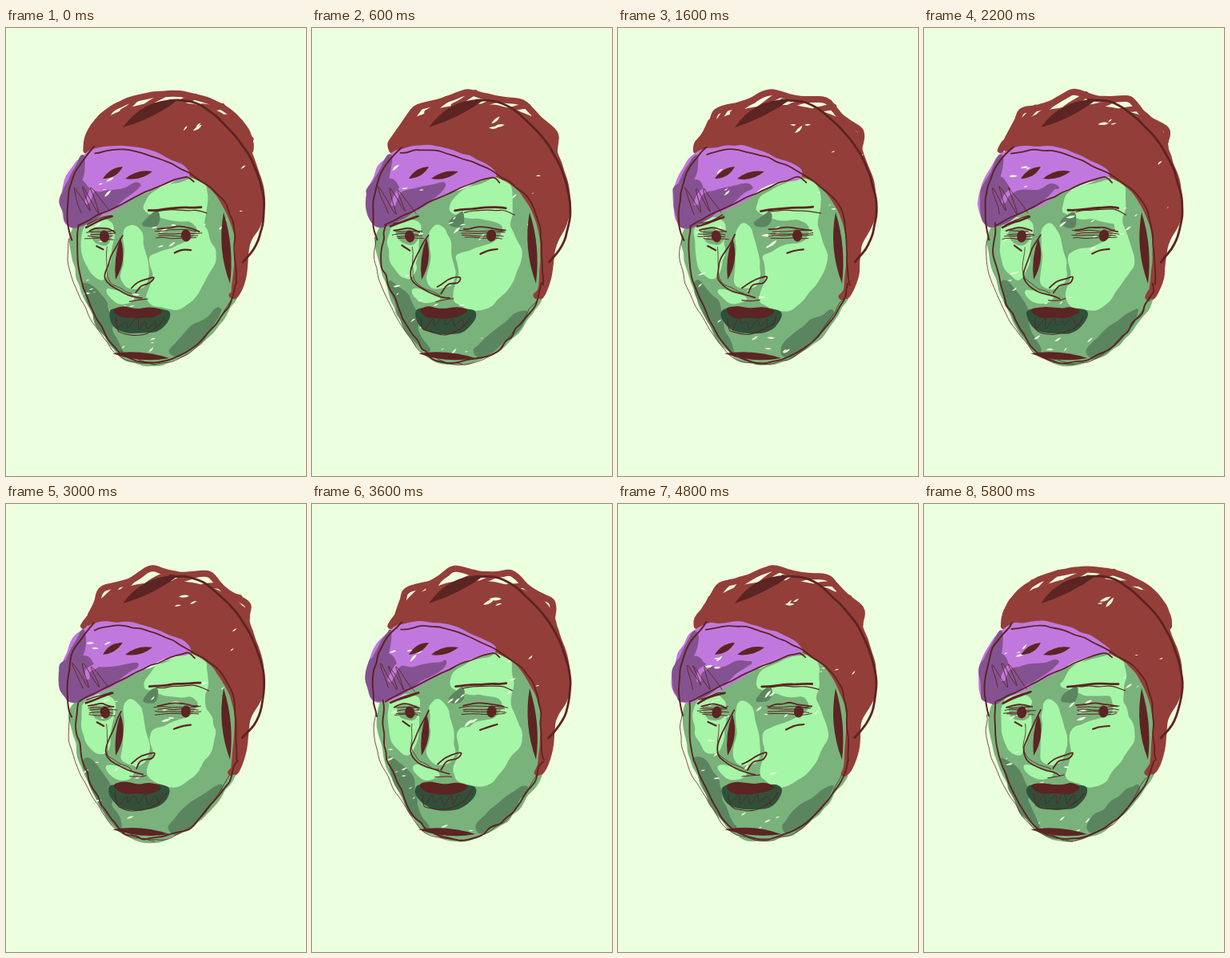
Animation, 375 px wide and 559 px high, one loop 6000 ms. Source, as an HTML page with a canvas:

```html
<!DOCTYPE html>
<html>
<head>
<meta charset="utf-8">
<style>
html, body { margin: 0; width: 100%; height: 100%; overflow: hidden; background: #ecffde }
canvas { display: block }
</style>
</head>
<body>
<canvas id="stage" width="375" height="559"></canvas>
<script>
const ctx = document.getElementById('stage').getContext('2d');
const PAPER = '#ecffde', LIGHT = '#a5f6a6', MID = '#7ab27b', DARK = '#5b855f', DEEP = '#30503a',
  HAT = '#943e39', INK = '#5c2422', PURPLE = '#c178de', PLUM = '#855291';
const STEP = 200, COUNT = 30;
const JAW = '90,246 90,300 110,355 142,405 185,418 235,398 278,348 287,320';

let seed;
function rnd() {
  seed = (seed * 16807) % 2147483647;
  return seed / 2147483647;
}
const jit = amount => (rnd() * 2 - 1) * amount;
const keys = text => text.split(' ').map(pair => pair.split(',').map(Number));

// Catmull-Rom through a few key points, sampled about every `gap` pixels
function sample(points, closed, gap) {
  const n = points.length, out = [];
  const at = i => points[closed ? (i + n) % n : Math.max(0, Math.min(n - 1, i))];
  for (let i = 0; i < (closed ? n : n - 1); i++) {
    const [a, b, c, d] = [at(i - 1), at(i), at(i + 1), at(i + 2)];
    const parts = Math.max(1, Math.round(Math.hypot(c[0] - b[0], c[1] - b[1]) / gap));
    for (let k = 0; k < parts; k++) {
      const t = k / parts;
      out.push([0, 1].map(j => b[j] + t / 2 * (c[j] - a[j] +
        t * (2 * a[j] - 5 * b[j] + 4 * c[j] - d[j] + t * (3 * (b[j] - c[j]) + d[j] - a[j])))));
    }
  }
  if (!closed) out.push(points[n - 1]);
  return out;
}

// Shaky hand: the key curve is resampled and every sample is nudged
function trace(shape, closed, shake, gap = 10) {
  const points = typeof shape === 'string' ? keys(shape) : shape;
  const p = sample(points, closed, gap).map(([x, y]) => [x + jit(shake), y + jit(shake)]);
  const n = p.length, mid = (a, b) => [(a[0] + b[0]) / 2, (a[1] + b[1]) / 2];
  ctx.beginPath();
  ctx.moveTo(...(closed ? mid(p[n - 1], p[0]) : p[0]));
  for (let i = closed ? 0 : 1; i < n; i++) {
    const last = !closed && i === n - 1;
    ctx.quadraticCurveTo(...p[i], ...(last ? p[i] : mid(p[i], p[(i + 1) % n])));
  }
}

function fill(color, shape, shake = 2, edge = 4) {
  trace(shape, true, shake);
  ctx.fillStyle = ctx.strokeStyle = color;
  ctx.lineWidth = edge;
  ctx.fill();
  ctx.stroke();
}

function line(shape, width = 1.6, shake = 1, color = INK) {
  trace(shape, false, shake);
  ctx.strokeStyle = color;
  ctx.lineWidth = width;
  ctx.stroke();
}

// A pointed stroke, `fat` pixels thick in the middle
function blade(x1, y1, x2, y2, fat, bend = 0, color = INK) {
  const len = Math.hypot(x2 - x1, y2 - y1), nx = (y2 - y1) / len, ny = (x1 - x2) / len;
  const cx = (x1 + x2) / 2 + jit(1), cy = (y1 + y2) / 2 + jit(1);
  ctx.fillStyle = color;
  ctx.beginPath();
  ctx.moveTo(x1, y1);
  for (const [off, x, y] of [[bend + fat, x2, y2], [bend - fat, x1, y1]])
    ctx.quadraticCurveTo(cx + nx * off, cy + ny * off, x, y);
  ctx.fill();
}

// Slivers of bare paper
function chips(count, x, y, rx, ry, size) {
  while (count--) {
    const cx = x + jit(rx), cy = y + jit(ry), a = jit(.5) - .4, r = size * (.4 + rnd() * .6);
    const dx = Math.cos(a) * r, dy = Math.sin(a) * r;
    blade(cx - dx, cy - dy, cx + dx, cy + dy, r * .5, 0, PAPER);
  }
}

function scribble(x, y, w, h, loops, slant) {
  const points = [];
  for (let i = 0; i <= loops * 2; i++) {
    const side = i % 2 ? -1 : 1;
    points.push([x + w * (i / loops / 2 - .5) - side * slant + jit(2), y + side * h / 2 + jit(3)]);
  }
  line(points, .9, 1);
}

function drawFace() {
  fill(MID, JAW + ' 284,250 262,205 235,188 180,207', 2, 7);
  fill(DARK, '97,318 124,342 132,378 145,404 117,374', 2.5);
  fill(DARK, '268,352 234,374 204,402 210,411 244,389', 2.5);
  fill(LIGHT, '173,227 190,203 240,189 250,215 247,245 261,285 250,312 225,345 202,350 178,338 187,306 182,285 206,275 235,264 238,242 200,236', 2.5);
  fill(LIGHT, '150,249 166,252 177,308 165,324 146,318 150,285', 2);
  fill(LIGHT, '101,246 132,244 128,299 117,312 98,288', 2.5);
  fill(LIGHT, '126,327 160,337 140,343', 1.5);
  fill(MID, '105,253 133,253 127,270 110,266', 1.5, 2);
  fill(DARK, '170,245 190,229 188,247', 2, 2);
  chips(5, 195, 255, 22, 20, 7);
  chips(4, 118, 255, 20, 12, 6);
  chips(6, 155, 350, 45, 25, 5);
  chips(5, 175, 400, 40, 14, 5);
  chips(4, 260, 230, 14, 40, 5);
  chips(3, 110, 315, 14, 20, 5);
}

// Half ellipse over the head, inset by a function of its position u
function arch(inset, ry) {
  return Array.from({ length: 37 }, (_, i) => {
    const u = i / 36, a = Math.PI * (1 + u), k = inset(u);
    return [203 + (103 - k) * Math.cos(a), 152 + (ry - k) * Math.sin(a)];
  });
}

function drawHat(frame) {
  const peak = Math.sqrt(Math.sin(Math.PI * frame / (COUNT - 1)) + 1e-9);
  const drift = frame ? jit(.03) : 0;
  const crest = arch(u => peak * (11 * Math.abs(Math.sin(4.5 * Math.PI * (u + drift))) - 5), 70);
  const core = arch(() => 2, 60 - 4 * peak);
  fill(HAT, [...core, ...keys('320,200 319,240 303,270 298,312 284,336 287,260 260,203 210,174 155,153 110,154')], .8);
  line(crest, 8, .6, HAT);
  // Zigzag between crest and crown
  for (let i = 3; i < 32; i += 4) line([core[i], crest[i + 3]], 5 + rnd() * 3, 1.5, HAT);
  line('292,300 289,322 281,335', 8, 2, HAT);
  chips(3, 227, 121, 14, 7, 8);
  chips(2, 285, 190, 20, 40, 4);
}

function drawBand() {
  fill(PURPLE, '98,158 155,149 205,166 230,183 190,195 130,227 80,246 71,205', 2);
  fill(PLUM, '71,202 94,189 116,206 166,197 127,227 79,247', 3);
  fill(PLUM, '98,158 84,180 72,208 94,190', 1.5, 3);
  line('100,217 108,203 121,197', 6, 3, PURPLE);
  chips(4, 118, 190, 22, 18, 6);
}

function eye(x, y, w, pupil) {
  line([[x - w / 2, y - 5], [x, y - 9], [x + w / 2, y - 4]], 1.8, 1.2);
  for (let i = 0; i < 4; i++)
    line([[x - w / 2 + jit(4), y - 4 + i * 3], [x + w / 2 + jit(4), y - 4 + i * 3]], 1, 1.5);
  ctx.fillStyle = INK;
  ctx.beginPath();
  ctx.ellipse(pupil + jit(1), y + 2, 6, 7.5, jit(.3), 0, 7);
  ctx.fill();
}

function drawInk() {
  // Hat and band
  blade(146, 124, 216, 89, 14, 7);
  line('205,90 245,97 297,148 322,212 316,264 296,292', 2.8, .6);
  line('110,157 150,152 209,171 262,204 283,240 287,290 289,320', 1.8, 1.4);
  blade(272, 230, 280, 319, 11, -1);
  line('111,148 86,180 77,215 77,248 82,265', 2, 1.2);
  scribble(103, 215, 34, 32, 3, -8);
  line('91,246 143,220 190,198 228,185 235,192', 1.8, 1);
  blade(121, 188, 146, 173, 8);
  blade(149, 188, 183, 179, 8);

  // Jaw
  line(JAW, 1.9, rnd() < .6 ? 3 : 1);
  line('80,262 78,290 94,340 139,407 187,420', .8, 1.5);
  line('142,405 187,420 239,397 281,338', .8, 2);
  blade(133, 406, 204, 412, 9);

  // Eyes and brows
  eye(119, 258, 32, 123);
  eye(215, 257, 52, 225);
  line('99,248 119,240 133,235', 2.6, 1.2);
  line('102,245 131,234', 1.3, 1.5);
  line('179,228 211,225 243,224', 2.8, 1);
  line('189,229 239,227 252,232', 1.2, 1.6);
  line('113,272 122,277', 2.2, 1);
  line('211,281 219,277 232,276', 2.2, 1.2);

  // Nose
  blade(143, 262, 137, 314, 9, 3);
  line('145,258 131,285 124,313 142,328 171,338', 1.7, 1.5);
  line('126,273 127,313 158,332', .8, 2);
  line('156,324 170,315 187,310 183,318 168,321 162,331', 1.8, 1.3);
  line('155,341 176,339', 1.1, 1.5);
}

function drawMouth() {
  fill(DEEP, '131,354 166,353 202,355 187,377 145,376', 1.3, 5);
  fill(INK, '133,351 147,348 165,351 184,349 197,353 184,360 143,360', 1.3, 2);
  scribble(167, 368, 48, 14, 4, 2);
  line('138,362 138,376 164,382 187,375 199,360', 1.1, 2);
}

function render() {
  const frame = Math.floor(performance.now() / STEP) % COUNT;
  seed = frame * 7919 + 1733;
  ctx.lineJoin = ctx.lineCap = 'round';
  ctx.fillStyle = PAPER;
  ctx.fillRect(0, 0, 375, 559);
  drawFace();
  drawHat(frame);
  drawBand();
  drawInk();
  drawMouth();
  requestAnimationFrame(render);
}
render();
</script>
</body>
</html>
```
